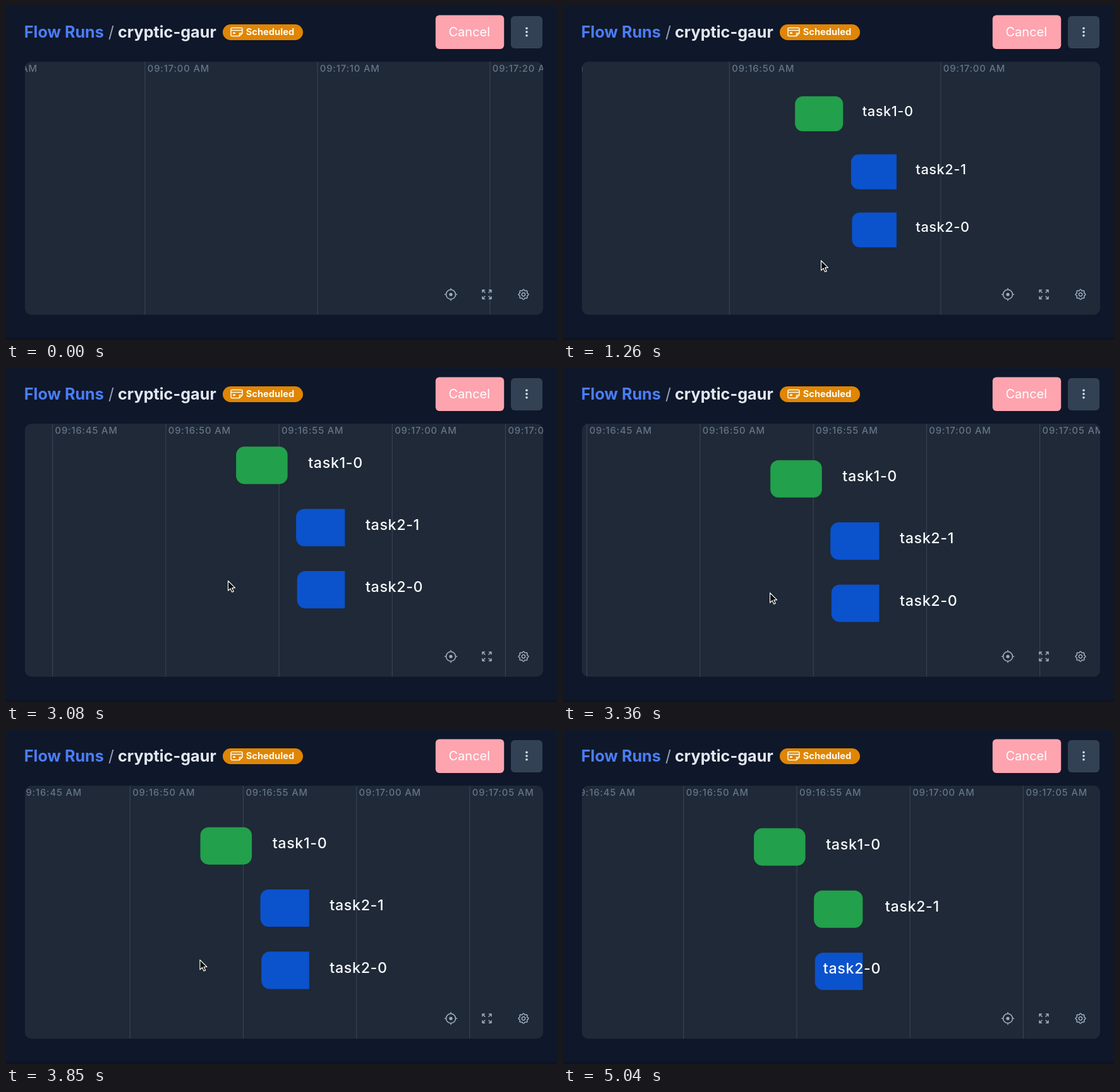
Recreate the animation shown at these times as an HTML page with a canvas. Size 872x528 px, loop 8000 ms.

```html
<!DOCTYPE html>
<html lang="en">
<head>
<meta charset="utf-8">
<title>Flow run timeline</title>
<style>
  html, body { margin: 0; width: 100%; height: 100%; overflow: hidden; background: #0f172a; }
  canvas { display: block; }
</style>
</head>
<body>
<canvas id="stage" width="872" height="528"></canvas>
<script>
const ctx = document.getElementById('stage').getContext('2d');
const LOOP = 8000, STEP = 70, BASE = 27.3;
const GREEN = '#22a04b', BLUE = '#0b52cd', ICON = '#a0aec0';

const ramp = (t, from, to) => Math.min(1, Math.max(0, (t - from) / (to - from)));
const smooth = (t, from, to) => {
  const p = ramp(t, from, to);
  return p * p * (3 - 2 * p);
};

// How far the two drags have carried the timeline
function dragged(t) {
  const a = smooth(t, 3130, 3425), b = smooth(t, 3570, 3990);
  return { x: -41 * a - 21 * b, y: 24.5 * a + 6.5 * b };
}

// x0 is the place of 09:16:50, k the scale, top the first row
function viewAt(t) {
  const k = 1.2253 ** ramp(t, 980, 1260) * 1.0715 ** ramp(t, 1610, 1820);
  const home = -53.5 + 343.5 * ramp(t, 0, 140), drag = dragged(t);
  return {
    k,
    x0: 410 + (home - 410) * k + drag.x,
    top: 402 + (190.5 - 402) * k + drag.y
  };
}

// Free pointer moves: start, end, dx, dy
const MOVES = [
  [560, 700, -12.5, -48.5],
  [1890, 2065, -14, 18], [2065, 2310, -20, -25], [2310, 2730, -27, -23],
  [2730, 3080, 4, -36], [3080, 3150, 12, -2.5],
  [4200, 4410, -13, 134]
];

function pointerAt(t) {
  const p = dragged(t);
  p.x += 421;
  p.y += 451;
  for (const [from, to, dx, dy] of MOVES) {
    const f = ramp(t, from, to);
    p.x += dx * f;
    p.y += dy * f;
  }
  return p;
}

function box(x, y, w, h, r, color) {
  ctx.fillStyle = color;
  ctx.beginPath();
  ctx.roundRect(x, y, w, h, r);
  ctx.fill();
}

function text(str, x, y, size, weight, color, spacing = 0) {
  ctx.font = `${weight} ${size}px Inter, sans-serif`;
  ctx.letterSpacing = spacing + 'px';
  ctx.fillStyle = color;
  ctx.fillText(str, x, y);
}

function dot(x, y, r, color) {
  ctx.fillStyle = color;
  ctx.beginPath();
  ctx.arc(x, y, r, 0, 7);
  ctx.fill();
}

function shape(d, x, y, color, width, fill) {
  const path = new Path2D(d);
  ctx.save();
  ctx.translate(x, y);
  if (fill) {
    ctx.fillStyle = fill;
    ctx.fill(path);
  }
  ctx.strokeStyle = color;
  ctx.lineWidth = width;
  ctx.lineCap = ctx.lineJoin = 'round';
  ctx.stroke(path);
  ctx.restore();
}

function header() {
  text('Flow Runs', 28.8, 50, 25.2, 700, '#4b7df8');
  text('/', 162, 50, 25, 400, '#94a3b8');
  text('cryptic-gaur', 177, 50, 25.2, 700, '#e2e8f0');

  box(343, 29, 127, 25, 12.5, '#e08504');
  shape('M2 0H16Q18 0 18 2V8.5L13.5 13H2Q0 13 0 11V2Q0 0 2 0ZM0 4H18M13.5 13V8.5H18', 356, 34.5, '#fffbeb', 1.5);
  box(359, 41.5, 4, 2.5, 0.5, '#fffbeb');
  text('Scheduled', 379.7, 46, 14.7, 700, '#fffbeb');

  box(679.8, 14.6, 108.4, 53.4, 6, '#fda4af');
  text('Cancel', 700.5, 48, 20, 400, '#fff');
  box(799, 16, 50, 51, 6, '#334155');
  for (let i = -1; i < 2; i++) dot(824, 41 + 5.7 * i, 1.8, '#dbe2ea');
}

function icons() {
  shape('M7.5 0A7.5 7.5 0 1 1 -7.5 0A7.5 7.5 0 1 1 7.5 0M0 -9.5V-7.5M0 7.5V9.5M-9.5 0H-7.5M7.5 0H9.5', 704, 456, ICON, 1.6);
  dot(704, 456, 2.6, ICON);
  for (const sx of [-1, 1]) for (const sy of [-1, 1])
    shape(`M${3 * sx} ${3 * sy}L${7 * sx} ${7 * sy}M${3.5 * sx} ${7 * sy}H${7 * sx}V${3.5 * sy}`, 761, 456, ICON, 1.5);
  let gear = '';
  for (let i = 0; i < 64; i++) {
    const a = i * Math.PI / 32, r = 7 + 0.9 * Math.cos(8 * a);
    gear += `${i ? 'L' : 'M'}${r * Math.cos(a)} ${r * Math.sin(a)}`;
  }
  shape(gear + 'ZM2.7 0A2.7 2.7 0 1 1 -2.7 0A2.7 2.7 0 1 1 2.7 0', 819, 456, ICON, 1.5);
}

function axis({ x0, k }) {
  const gap = k > 1.245 ? 5 : 10;
  for (let s = -20; s <= 40; s += gap) {
    const x = x0 + s * BASE * k, sec = 50 + s;
    ctx.fillStyle = '#364357';
    ctx.fillRect(x - 0.2, 88, 1.2, 400);
    const label = `09:${16 + Math.floor(sec / 60)}:${String(sec % 60).padStart(2, '0')} AM`;
    text(label, x + 4.3, 104, 14.8, 500, '#64748b', 0.85);
  }
}

function tasks({ x0, k, top }, t) {
  const second = BASE * k, done = t >= 4970, inside = t >= 5040;
  const rows = [
    ['task1-0', 3.115, 5.39, true],
    ['task2-1', 5.765, 7.92, done],
    ['task2-0', 5.81, 7.92, false]
  ];
  rows.forEach(([name, from, to, finished], i) => {
    const x = x0 + from * second, end = x0 + to * second;
    const y = top + i * 74.9 * k, r = 10 * k;
    box(x, y, end - x, 45 * k, finished ? r : [r, 0, 0, r], finished ? GREEN : BLUE);
    const left = i === 2 && inside ? x + 10 * k : end + (i && finished ? 27 : 24.8) * k;
    text(name, left, y + 25.3 * k, 17.7 * k, 500, '#f8fafc', 0.5 * k);
  });
}

function draw(now) {
  const t = Math.floor((now % LOOP) / STEP + 1e-6) * STEP;
  const view = viewAt(t);
  ctx.fillStyle = '#0f172a';
  ctx.fillRect(0, 0, 872, 528);
  ctx.fillStyle = '#0c1323';
  ctx.fillRect(0, 524, 872, 4);
  header();

  box(30, 88, 820, 400, 10, '#1f2937');
  ctx.save();
  ctx.clip();
  axis(view);
  if (t >= STEP) tasks(view, t);
  icons();
  ctx.restore();

  if (t >= 560 && t < 4480) {
    const p = pointerAt(t);
    shape('M0 0V15.5L3.6 12.2L6.2 17.7L8.7 16.6L6.2 11.2H11Z', p.x, p.y, '#fff', 1.2, '#000');
  }
}

let start;
function tick(now) {
  start ??= now;
  draw(now - start);
  requestAnimationFrame(tick);
}
requestAnimationFrame(tick);
</script>
</body>
</html>
```
